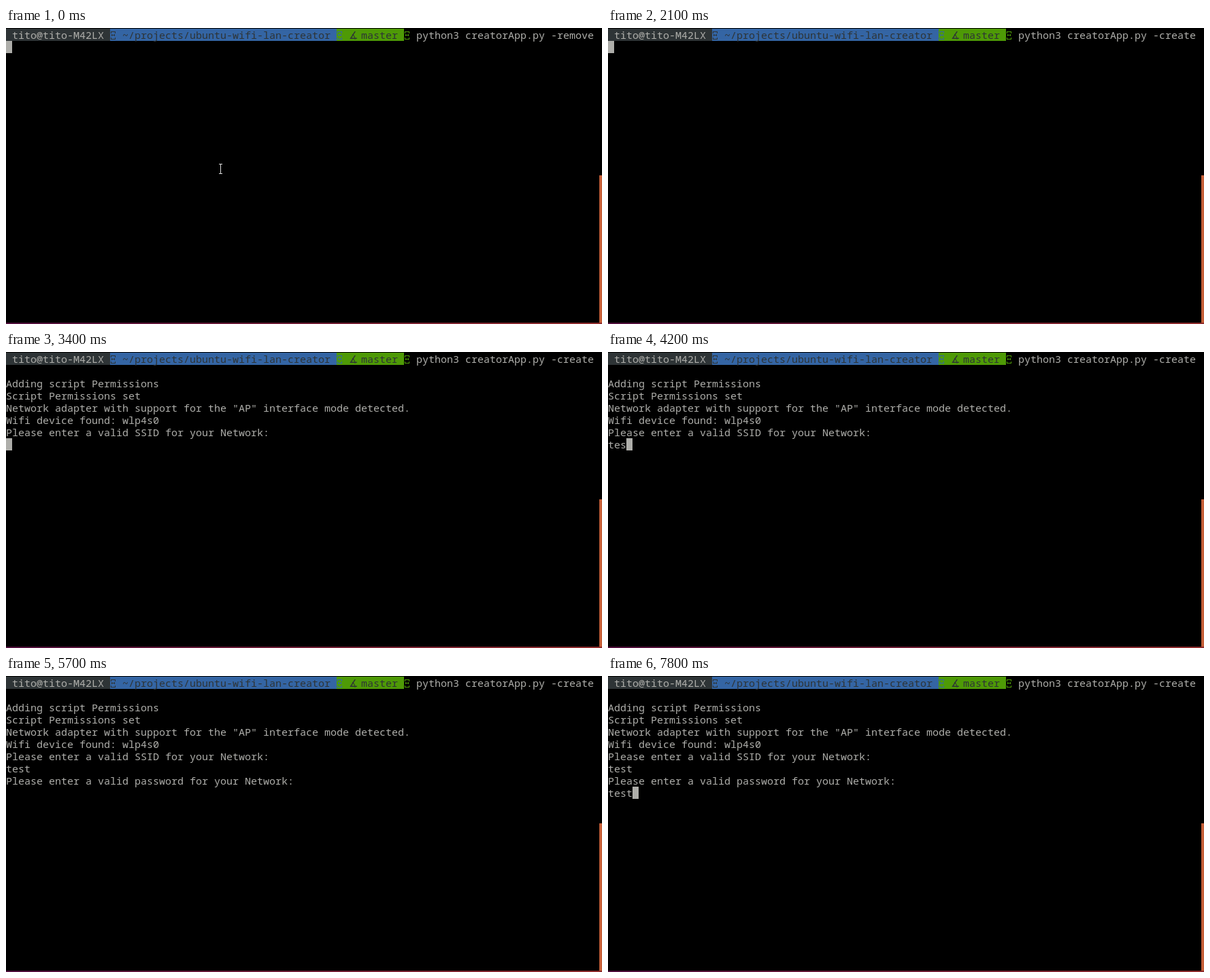
Animation of 876x436 px, one loop 8000 ms. Source, as an HTML page with a canvas:

```html
<!DOCTYPE html>
<html lang="en">
<head>
<meta charset="utf-8">
<title>Terminal session</title>
<style>
  html, body { margin: 0; width: 100%; height: 100%; overflow: hidden; background: #000; }
  canvas { display: block; }
</style>
</head>
<body>
<canvas id="screen" width="876" height="436"></canvas>
<script>
const ctx = document.getElementById('screen').getContext('2d');
const CELL = 9, ROW = 18, LOOP = 8000;
const GREY = '#aeaeaa', DARK = '#2e3436', BLUE = '#3465a4', GREEN = '#4e9a06';

// Output lines: [time, row, text]
const lines = [
  [2400, 2, 'Adding script Permissions'],
  [2400, 3, 'Script Permissions set'],
  [2400, 4, 'Network adapter with support for the "AP" interface mode detected.'],
  [2800, 5, 'Wifi device found: wlp4s0'],
  [2800, 6, 'Please enter a valid SSID for your Network:'],
  [5500, 8, 'Please enter a valid password for your Network:']
];

// Typed answers: row and the time of each key
const answers = [
  { row: 7, text: 'test', keys: [4000, 4100, 4200, 4400] },
  { row: 9, text: 'test', keys: [6900, 6900, 7200, 7500] }
];

// Cursor states: [time, row], row 0 means hidden
const cursorStates = [
  [0, 1], [500, 0], [1000, 1], [2000, 0], [2100, 1], [2200, 2],
  [2400, 5], [2800, 0], [3400, 7], [4900, 0], [5200, 7],
  [5500, 9], [5700, 0], [6300, 9], [7700, 0], [7800, 9]
];

function rect(color, x, y, w, h) {
  ctx.fillStyle = color;
  ctx.fillRect(x, y, w, h);
}

function write(text, col, row, color = GREY) {
  ctx.fillStyle = color;
  ctx.fillText(text, col * CELL, row * ROW + 16);
}

function separator(col, color) {
  const x = col * CELL + 1;
  rect(color, x, 5, 7, 1);
  rect(color, x + 2, 10, 3, 1);
  rect(color, x, 16, 7, 1);
  for (const [dx, y] of [[0, 5], [6, 5], [1, 9], [5, 9], [0, 14], [6, 14]])
    rect(color, x + dx, y, 1, 3);
}

function prompt(command) {
  rect(DARK, 0, 1, 153, ROW);
  rect(BLUE, 153, 1, 333, ROW);
  rect(GREEN, 486, 1, 99, ROW);
  write('tito@tito-M42LX', 1, 0);
  separator(17, DARK);
  write('~/projects/ubuntu-wifi-lan-creator', 19, 0, DARK);
  separator(54, BLUE);
  write('∡', 56, 0, DARK);
  write('master', 58, 0, DARK);
  separator(65, GREEN);
  write(command, 67, 0);
}

function pointer() {
  rect('#ddd', 315, 201, 1, 13);
  rect('#ddd', 313, 200, 5, 1);
  rect('#ddd', 313, 214, 5, 1);
}

function desktopEdges() {
  const edge = ctx.createLinearGradient(0, 0, 876, 0);
  edge.addColorStop(0, '#4f0f3c');
  edge.addColorStop(1, '#8e2c2c');
  rect(edge, 0, 434, 876, 2);
  rect('#c55f38', 872, 217, 4, 217);
}

function draw(t) {
  rect('#000', 0, 0, 876, 436);
  ctx.font = '15px "Noto Sans Mono", "DejaVu Sans Mono", monospace';
  prompt('python3 creatorApp.py ' + (t < 900 ? '-remove' : '-create'));
  if (t < 900) pointer();
  for (const [time, row, text] of lines) if (t >= time) write(text, 0, row);

  const cursorRow = cursorStates.findLast(([time]) => t >= time)[1];
  let cursorCol = 0;
  for (const { row, text, keys } of answers) {
    const count = keys.filter(time => t >= time).length;
    write(text.slice(0, count), 0, row);
    if (row === cursorRow) cursorCol = count;
  }
  if (cursorRow) rect(GREY, cursorCol * CELL, cursorRow * ROW + 1, CELL, ROW);
  desktopEdges();
}

function tick() {
  draw(performance.now() % LOOP);
  requestAnimationFrame(tick);
}
tick();
</script>
</body>
</html>
```
